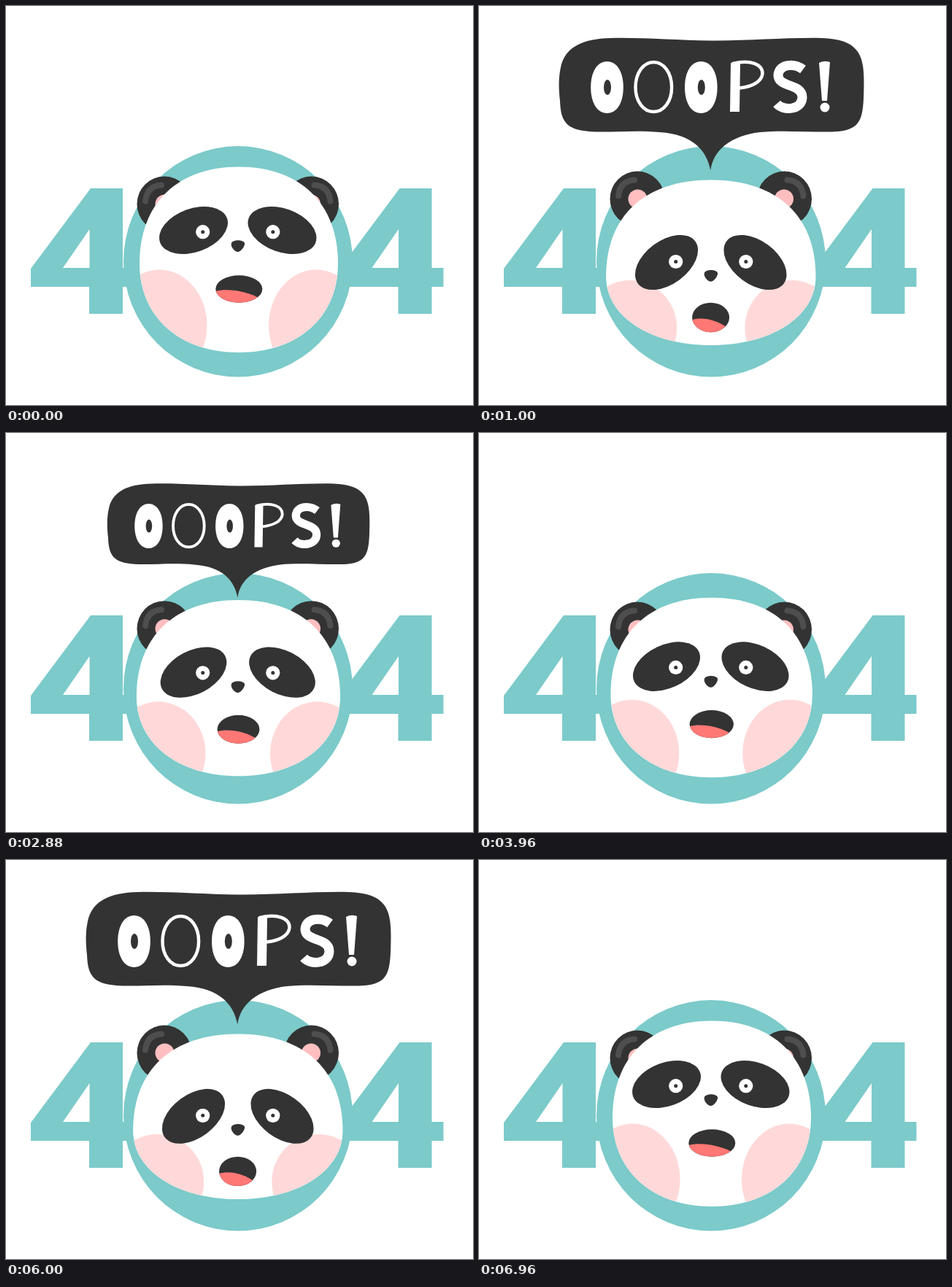
These frames come from a looping animation (640x547 px, 7.2 s). An HTML page with a canvas:

```html
<!DOCTYPE html>
<html lang="en">
<head>
<meta charset="utf-8">
<title>404</title>
<style>
html, body { margin: 0; width: 100%; height: 100%; overflow: hidden; background: #fff; }
canvas { display: block; }
</style>
</head>
<body>
<canvas id="stage" width="640" height="547" role="img" aria-label="404 Ooops!"></canvas>
<script>
const ctx = document.getElementById('stage').getContext('2d');
const TEAL = '#7ccaca', DARK = '#333', WHITE = '#fff', GREY = '#4e4e4e';
const CHEEK = '#ffd9d9', INNER_EAR = '#ffbfc0', TONGUE = '#ff7875';
const AXIS = 317.75;          // mirror line of the face
const CYCLE = 3600, STEP = 40;

const lerp = (a, b, p) => a + (b - a) * p;
const clamp = v => Math.min(1, Math.max(0, v));
const sineInOut = u => (1 - Math.cos(Math.PI * u)) / 2;
const backIn = u => u * u * (2.70158 * u - 1.70158);

function fill(path, color) {
  ctx.fillStyle = color;
  ctx.fill(path, 'evenodd');
}

function stroke(path, color, width, cap = 'round') {
  ctx.strokeStyle = color;
  ctx.lineWidth = width;
  ctx.lineCap = cap;
  ctx.lineJoin = 'round';
  ctx.stroke(path);
}

function oval(x, y, rx, ry = rx, angle = 0) {
  const path = new Path2D();
  path.ellipse(x, y, rx, ry, angle, 0, Math.PI * 2);
  return path;
}

// Rounded body with its own fullness above and below the widest line
function blob(x, top, mid, bottom, rx, kUp, kDown) {
  const path = new Path2D();
  const up = mid - top, down = bottom - mid;
  path.moveTo(x, top);
  path.bezierCurveTo(x + rx * kUp, top, x + rx, mid - up * kUp, x + rx, mid);
  path.bezierCurveTo(x + rx, mid + down * kDown, x + rx * kDown, bottom, x, bottom);
  path.bezierCurveTo(x - rx * kDown, bottom, x - rx, mid + down * kDown, x - rx, mid);
  path.bezierCurveTo(x - rx, mid - up * kUp, x - rx * kUp, top, x, top);
  return path;
}

// Draws the left side, then its mirror image
function bothSides(draw) {
  draw();
  ctx.save();
  ctx.translate(2 * AXIS, 0);
  ctx.scale(-1, 1);
  draw();
  ctx.restore();
}

const four = new Path2D(`M116 250H160V359H176V385H160V422H114V385H34V360Z
  M114.5 306V359H78Z`);
const earShine = new Path2D('M191 260.5Q193 240 213 238.5');
const nose = new Path2D(`M309 -4C311 -9 325 -9 327 -4C328 0 322 8 317.7 8
  C313 8 307 0 309 -4Z`);
const bubble = new Path2D(`M180 44C225 43 270 47 318 47.5C370 48 420 43 470 44
  C518 46 528 64 527.5 105C527 155 526 171 484 172.5C450 173 415 170 385 173
  C345 178 321 197 317.3 225.5C312 197 292 176 248 173C215 170 190 173 160 172.5
  C122 171 112 162 111 130C109 112 109 98 112 84C118 56 142 45 180 44Z`);
const pStem = new Path2D('M345 78L358 79L357 145L344 145Z');
const pBowl = new Path2D('M348 79C372 73 389 80 388.5 93C387 105 372 111 356 112.5');
const letterS = new Path2D(`M444 87C432 78 411 79 410 95C410 112 443 106 443 125
  C443 142 418 145 408 134`);
const bang = new Path2D('M466 78Q473 74 481 77L477 130H470Z');

function drawEars(p) {
  bothSides(() => {
    ctx.save();
    ctx.translate(0, lerp(7, 0, p));
    fill(oval(217, 264.5, 37.5, 38), DARK);
    stroke(earShine, GREY, 8);
    fill(oval(217.5, 264.5, 13), INNER_EAR);
    ctx.restore();
  });
}

function drawMouth(p) {
  const x = lerp(319.3, 317.6, p), y = lerp(388, 427, p);
  const rx = lerp(32, 25.5, p), ry = lerp(18.7, 20.2, p);
  const mouth = oval(x, y, rx, ry);
  fill(mouth, DARK);
  ctx.save();
  ctx.clip(mouth);
  ctx.translate(x, y);
  ctx.scale(rx, ry);
  fill(new Path2D('M-1.1 .2C-.6 -.08 .3 .08 .95 .75V1.2H-1.1Z'), TONGUE);
  ctx.restore();
}

function drawHead(p) {
  const head = blob(lerp(319, 317.8, p), lerp(220.5, 238.5, p), lerp(353, 371, p),
    lerp(475, 465, p), lerp(136, 143.7, p), lerp(.62, .63, p), lerp(.6, .58, p));
  fill(head, WHITE);

  ctx.save();
  ctx.clip(head);
  bothSides(() => fill(oval(lerp(210.5, 207, p), lerp(438, 441, p),
    lerp(65, 64.2, p), lerp(76.5, 65, p)), CHEEK));
  ctx.restore();

  const tilt = lerp(-20, -36.4, p) * Math.PI / 180;
  const eyeY = lerp(309.7, 350.5, p);
  bothSides(() => {
    fill(oval(257, lerp(307.5, 351.5, p), 48.8, 29.7, tilt), DARK);
    fill(oval(269.7, eyeY, 9.6), WHITE);
    fill(oval(269.7, eyeY, 2.5), DARK);
  });

  ctx.save();
  ctx.translate(0, lerp(329, 369.8, p));
  fill(nose, DARK);
  ctx.restore();
  drawMouth(p);
}

function drawFatO(x) {
  fill(blob(x, 76, 111.5, 147, 22.3, .6, .6), WHITE);
  fill(oval(x + .5, 111.5, 5, 10.5), DARK);
}

function drawBubble(size) {
  if (size <= 0) return;
  ctx.save();
  ctx.translate(318.5, 226.5);
  ctx.scale(size, size);
  ctx.translate(-318.5, -226.5);
  fill(bubble, DARK);
  drawFatO(175.5);
  stroke(blob(239.3, 77, 111.5, 145, 24.8, .57, .57), WHITE, 4.5);
  drawFatO(304.3);
  fill(pStem, WHITE);
  stroke(pBowl, WHITE, 4.5);
  stroke(letterS, WHITE, 13, 'butt');
  fill(bang, WHITE);
  fill(oval(474, 139, 6.5), WHITE);
  ctx.restore();
}

function facePose(t) {
  return sineInOut(t < 1700 ? clamp(t / 1000) : clamp((3360 - t) / 1000));
}

function bubbleSize(t) {
  return 1 - backIn(t < 1700 ? 1 - clamp((t - 580) / 400) : clamp((t - 2589) / 400));
}

function render(now) {
  const t = Math.floor(now % CYCLE / STEP) * STEP;
  const p = facePose(t);
  ctx.fillStyle = WHITE;
  ctx.fillRect(0, 0, 640, 547);
  fill(four, TEAL);
  ctx.save();
  ctx.translate(423.5, 0);
  fill(four, TEAL);
  ctx.restore();
  fill(oval(318, 350.3, 157, 158.2), TEAL);
  drawEars(p);
  drawHead(p);
  drawBubble(bubbleSize(t));
}

let start;
function tick(now) {
  start ??= now;
  render(now - start);
  requestAnimationFrame(tick);
}
render(0);
requestAnimationFrame(tick);
</script>
</body>
</html>
```
